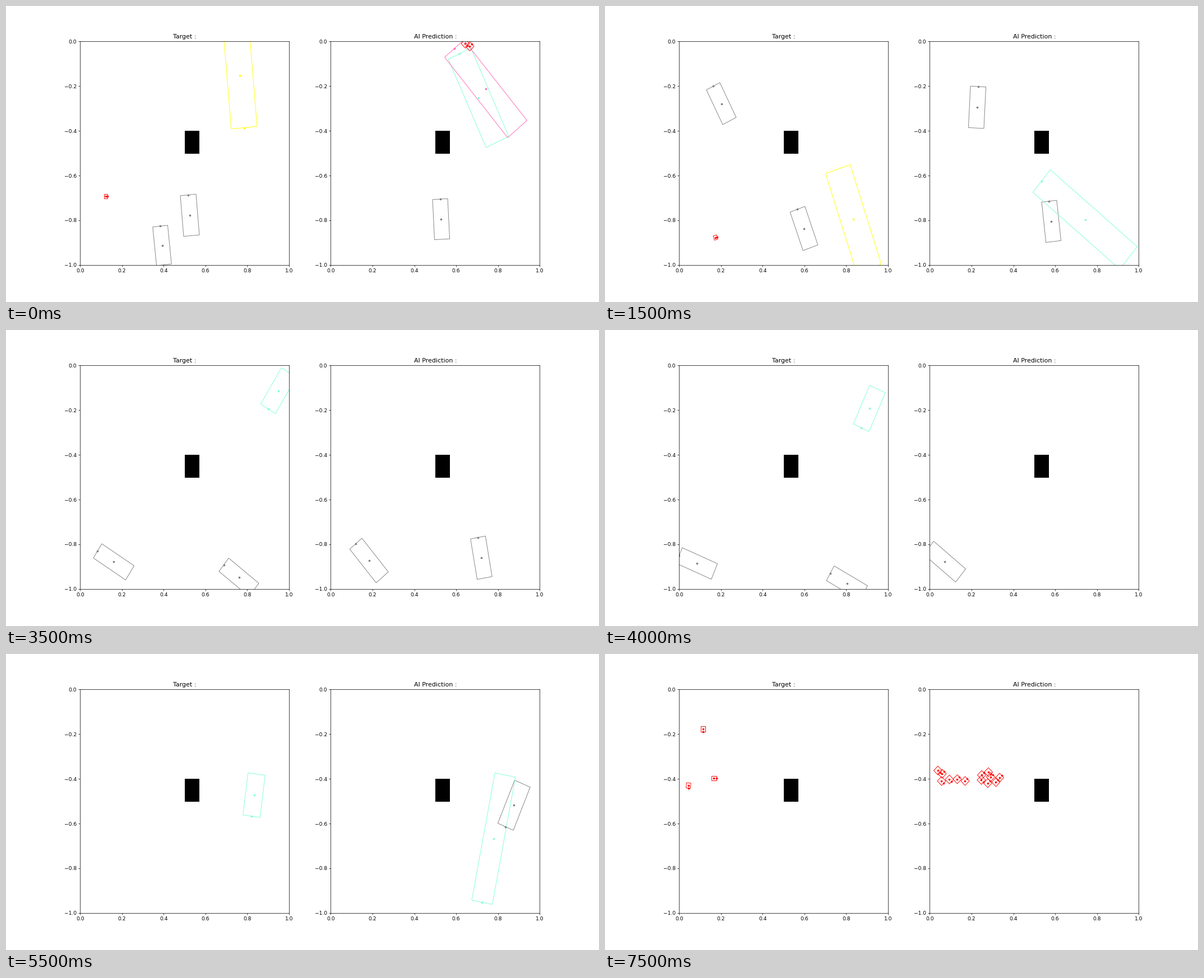
A matplotlib script that plays this animation: 1058x529 px, repeating every 8 s.

```python
import numpy as np
import matplotlib.pyplot as plt
from matplotlib.animation import FuncAnimation
from matplotlib.patches import Polygon, Rectangle

W, H = 1058, 529
FRAMES, STEP = 16, 500
LEFT, RIGHT = 0, 1
GRAY, YELLOW, RED = "gray", "yellow", "red"
MINT, PINK = "aquamarine", "hotpink"

plt.rcParams["font.family"] = "DejaVu Sans"
fig, axes = plt.subplots(1, 2, figsize=(16, 8), dpi=W / 16)
fig.subplots_adjust(left=0.125, right=0.9, bottom=0.125, top=0.88, wspace=0.2)

for ax, title in zip(axes, ("Target :", "AI Prediction :")):
    ax.set_xlim(0, 1)
    ax.set_ylim(-1, 0)
    ax.set_title(title, fontsize=12)
    ax.tick_params(labelsize=10)
    ax.add_patch(Rectangle((0.5, -0.503), 0.0715, 0.103, color="black", lw=0, zorder=3))

bodies = []


def body(panel, color, size, *keys, span=None, grown=None):
    """Key points are (step, x, y, heading): stage pixels, degrees left of up.
    Size is (half length, width) in axis units, changing evenly to grown."""
    keys = np.array(keys, float)
    span = span or (keys[0, 0], keys[-1, 0])
    bodies.append((panel, color, np.array(size), np.array(grown or size), keys, span))


CAR, SLIM_CAR, WIDE_CAR = (.0915, .0755), (.09, .0725), (.095, .0825)
PERSON, DIAMOND = (.0115, .021), (.0143, .0283)

# Left panel
body(LEFT, YELLOW, (.235, .124), (0, 417.3, 124, 185), (2, 434.6, 295, 194), span=(0, 3))
body(LEFT, GRAY, CAR, (0, 328, 374, 5), (2, 341, 386, 12.6), (5, 383, 421, 34),
     (7, 415.5, 442, 52), span=(0, 8))
body(LEFT, GRAY, (.087, .072), (0, 278.5, 428, 6), (2, 253, 249, 13.4), (4, 162, 100, 40))
body(LEFT, GRAY, CAR, (5, 249, 408.7, 38.5), (7, 192.2, 414.4, 57.5), span=(4, 8))
body(LEFT, MINT, WIDE_CAR, (7, 486, 108.5, 148.6), (10, 443, 203.3, 170),
     (13, 441.8, 350, 178), (14, 443, 424, 180))
body(LEFT, RED, (.0083, .02), (0, 178, 340, -90), (2, 190.8, 389.2, -80), span=(0, 3))
body(LEFT, RED, PERSON, (13, 153.3, 77, 172), (15, 149, 235, 175))
body(LEFT, RED, PERSON, (13, 200.3, 65.6, -94), (15, 194.3, 222.2, -90))
body(LEFT, RED, PERSON, (15, 174.7, 134, 180))

# Right panel
body(RIGHT, GRAY, SLIM_CAR, (0, 776.3, 381, 3), (2, 788, 377.8, 6), (5, 813, 399, 7.5),
     (7, 848, 407, 10), grown=(.092, .0725))
body(RIGHT, GRAY, (.093, .074), (2, 667, 251, -9.5), (3, 664, 181, -3), span=(1, 3))
body(RIGHT, GRAY, (.0984, .076), (7, 647.7, 412, 40), (8, 606, 414, 51))
body(RIGHT, MINT, (.2175, .119), (0, 843, 164, 24.6), (2, 852, 309, 41.8), span=(0, 3),
     grown=(.27, .131))
body(RIGHT, PINK, (.235, .12), (0, 856, 148, 40))
body(RIGHT, PINK, (.311, .134), (1, 857, 233, 180), (2, 859, 319, 140))
body(RIGHT, GRAY, (.086, .073), (9, 930, 112, 150), (10, 903, 224.3, 153),
     (13, 913, 362.2, 166), grown=(.123, .088))
body(RIGHT, GRAY, (.05, .048), (10, 868, 223.5, 44))
body(RIGHT, MINT, (.29, .1), (11, 870, 330, 169), (13, 909.3, 378.3, 163.6),
     grown=(.173, .104))


def walker(step, x, y, down):
    body(RIGHT, RED, DIAMOND, (step, x, y, -135 if down else -45))


# A falling pair, a row of four and a ring of six around one
for k in range(2):
    walker(0, 819.5 + 8 * k, 67.3 + 5 * k, k == 0)
    walker(15, 594 + 7.5 * k, 208.3 + 5.7 * k, k == 0)
for k in range(4):
    walker(15, 600.5 + 14 * k, 225 + 2 * np.cos(2 * k), k < 2)
for k in range(6):
    turn = np.radians(52 * k)
    walker(15, 687 + 17 * np.cos(turn), 221 + 10 * np.sin(turn), k in (3, 5))
walker(15, 688, 219.7, False)


def pose_at(step, keys):
    """Straight lines between key points, carried on past the ends."""
    if len(keys) == 1:
        return keys[0, 1:]
    i = np.clip(np.searchsorted(keys[:, 0], step) - 1, 0, len(keys) - 2)
    a, b = keys[i], keys[i + 1]
    return a[1:] + (b - a)[1:] * (step - a[0]) / (b[0] - a[0])


def to_axis(panel, x, y):
    width = W * 0.775 / 2.2
    left = W * 0.125 + panel * width * 1.2
    return np.array([(x - left) / width, (H * 0.12 - y) / (H * 0.755)])


def draw_box(panel, color, size, x, y, heading):
    mid = to_axis(panel, x, y)
    turn = np.radians(heading)
    ahead = size[0] * np.array([-np.sin(turn), np.cos(turn)])
    side = size[1] / 2 * np.array([np.cos(turn), np.sin(turn)])
    corners = [mid + ahead + side, mid + ahead - side,
               mid - ahead - side, mid - ahead + side]
    ax = axes[panel]
    box = ax.add_patch(Polygon(corners, fill=False, edgecolor=color, lw=1))
    dots, = ax.plot(*zip(mid, mid + ahead), ".", color=color, ms=6)
    return [box, dots]


live = []


def clear():
    while live:
        live.pop().remove()


def update(step):
    clear()
    for panel, color, size, grown, keys, (first, last) in bodies:
        if first <= step <= last:
            part = (step - first) / max(last - first, 1)
            now = size + (grown - size) * part
            live.extend(draw_box(panel, color, now, *pose_at(step, keys)))
    return live


anim = FuncAnimation(fig, update, frames=FRAMES, init_func=clear, interval=STEP,
                     repeat=True, repeat_delay=0, blit=False)
plt.show()
```
